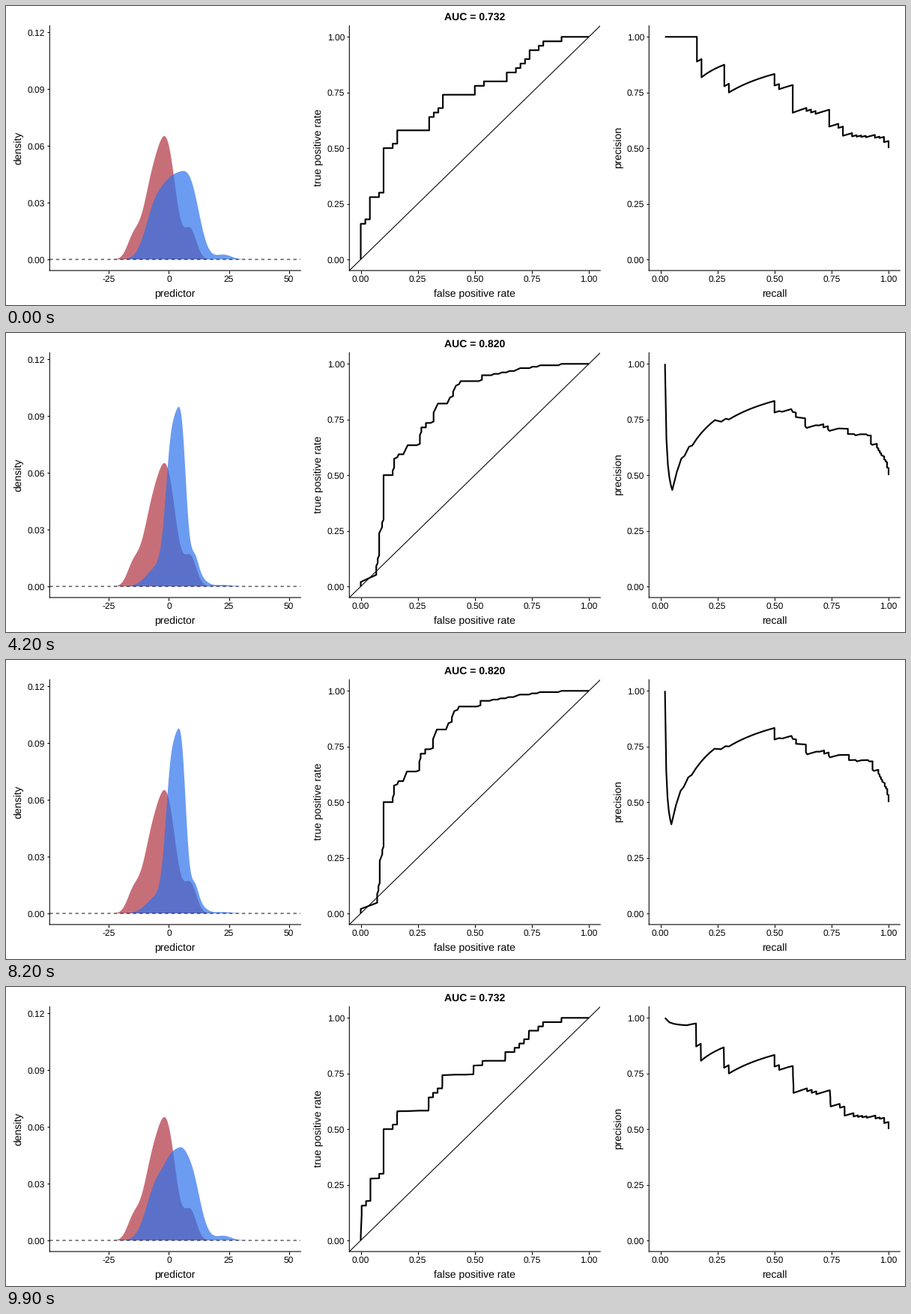
A matplotlib script that plays this animation: 1200 by 400 pixels, repeating every 10000 ms.

```python
import numpy as np
import matplotlib.pyplot as plt
from matplotlib.animation import FuncAnimation

W, H, DPI = 1200, 400, 100
PT = 72 / DPI  # points per pixel
THIN, THICK = 1.07 * PT, 2.13 * PT
FRAMES, INTERVAL = 100, 100

plt.rcParams.update({
    "font.family": "Liberation Sans",
    "text.hinting": "none",
    "axes.linewidth": THIN,
    "axes.unicode_minus": False,
    "path.snap": False,
})

# Score distributions as normal mixtures: (weight, mean, sd)
RED = [(.06, -15, 2.5), (.39, -6.8, 4), (.455, -.4, 3.55), (.095, 9, 2.5)]
BLUE_A = [(.26, -5.8, 4.1), (.37, 1.8, 4.3), (.335, 9.1, 3.9), (.02, 22.8, 3.2)]
BLUE_B = [(.53, 1.1, 2.3), (.026, 3, 1.3), (.417, 5.3, 1.85), (.027, 11, 1.35)]

# Rankings by falling score: alternating runs of positives and negatives
ONE = [1]
RANK_A = ([8] + ONE * 3 + [5, 2, 1, 1, 10, 2, 1, 1, 3, 7, 3] + ONE * 5
          + [3, 7, 2, 2, 1, 5, 2, 2] + ONE * 6 + [2, 2] + ONE * 3 + [4, 1, 6])
RANK_B = [1, 5, 24, 2, 4] + ONE * 3 + [3, 3, 4, 1, 1, 2, 5, 2, 2, 1, 3, 1, 1,
                                       5, 1, 26]


def density(mixture, x):
    return sum(w / (sd * np.sqrt(2 * np.pi)) * np.exp(-((x - m) / sd) ** 2 / 2)
               for w, m, sd in mixture)


def curves(runs):
    """ROC points, precision-recall points and AUC of one ranking."""
    hit = np.repeat(np.arange(len(runs)) % 2 == 0, runs)
    tp = np.append(0, np.cumsum(hit))
    fp = np.append(0, np.cumsum(~hit))
    tpr, fpr = tp / tp[-1], fp / fp[-1]
    auc = np.sum(np.diff(fpr) * tpr[1:])
    precision = tp[1:] / (tp + fp)[1:]
    return np.array([fpr, tpr]), np.array([tpr[1:], precision]), auc


def label(x, y, s, size=14, **kw):
    return fig.text(x / W, 1 - y / H, s, size=size * PT, va="baseline",
                    rotation_mode="anchor", **kw)


def panel(left, xlim, ylim, xticks, yticks, xfmt, xname, yname):
    top, width, height = 26.4, 335, 327.5
    bottom = top + height
    ax = fig.add_axes([left / W, 1 - bottom / H, width / W, height / H])
    ax.patch.set_visible(False)
    ax.spines[["top", "right"]].set_visible(False)
    ax.set(xlim=xlim, ylim=ylim, xticks=xticks, yticks=yticks)
    ax.tick_params(length=3.5 * PT, width=THIN,
                   labelleft=False, labelbottom=False)
    for v in xticks:
        x = left + width * (v - xlim[0]) / (xlim[1] - xlim[0])
        label(x, bottom + 15.4, format(v, xfmt), 12, ha="center")
    for v in yticks:
        y = bottom - height * (v - ylim[0]) / (ylim[1] - ylim[0])
        label(left - 6.2, y + 4.4, format(v, ".2f"), 12, ha="right")
    label(left + width / 2, bottom + 35, xname, ha="center")
    label(left - 37.5, top + height / 2 - .7, yname, ha="center", rotation=90)
    return ax


def thick_line(ax):
    return ax.plot([], [], color="black", lw=THICK,
                   solid_joinstyle="round", solid_capstyle="butt")[0]


def area(x, y):
    return np.column_stack([np.r_[x, x[::-1]], np.r_[y, 0 * y]])


fig = plt.figure(figsize=(W / DPI, H / DPI), dpi=DPI, facecolor="white")
unit, ticks = (-.05, 1.05), [0, .25, .5, .75, 1]

dens_ax = panel(58.3, (-49.7, 54.9), (-.00588, .1234), [-25, 0, 25, 50],
                [0, .03, .06, .09, .12], "d", "predictor", "density")
roc_ax = panel(458.3, unit, unit, ticks, ticks, ".2f",
               "false positive rate", "true positive rate")
pr_ax = panel(858.3, unit, unit, ticks, ticks, ".2f", "recall", "precision")
title = label(625.8, 19, "", ha="center", weight="bold")

xs = np.linspace(-25, 32, 512)
blue_a, blue_b = density(BLUE_A, xs), density(BLUE_B, xs)
roc_a, pr_a, auc_a = curves(RANK_A)
roc_b, pr_b, auc_b = curves(RANK_B)

dens_ax.fill(*area(xs, density(RED, xs)).T, color="#b03241", alpha=.7, lw=0)
blue, = dens_ax.fill(*area(xs, blue_a).T, color="#2d72ec", alpha=.7, lw=0)
dens_ax.axhline(0, color="#22142a", lw=THIN, ls=(0, (4, 4)))
roc_ax.plot(unit, unit, color="black", lw=THIN)
roc, pr = thick_line(roc_ax), thick_line(pr_ax)


def draw(i):
    # Hold, morph, hold, morph back: a quarter of the loop each
    t = np.interp(i, [25, 50, 75, 100], [0, 1, 1, 0])

    def mix(a, b):
        return a + t * (b - a)

    blue.set_xy(area(xs, mix(blue_a, blue_b)))
    roc.set_data(*mix(roc_a, roc_b))
    pr.set_data(*mix(pr_a, pr_b))
    title.set_text(f"AUC = {auc_b if 39 <= i < 89 else auc_a:.3f}")
    return blue, roc, pr, title


anim = FuncAnimation(fig, draw, frames=FRAMES, interval=INTERVAL,
                     repeat=True, repeat_delay=0)
plt.show()
```
